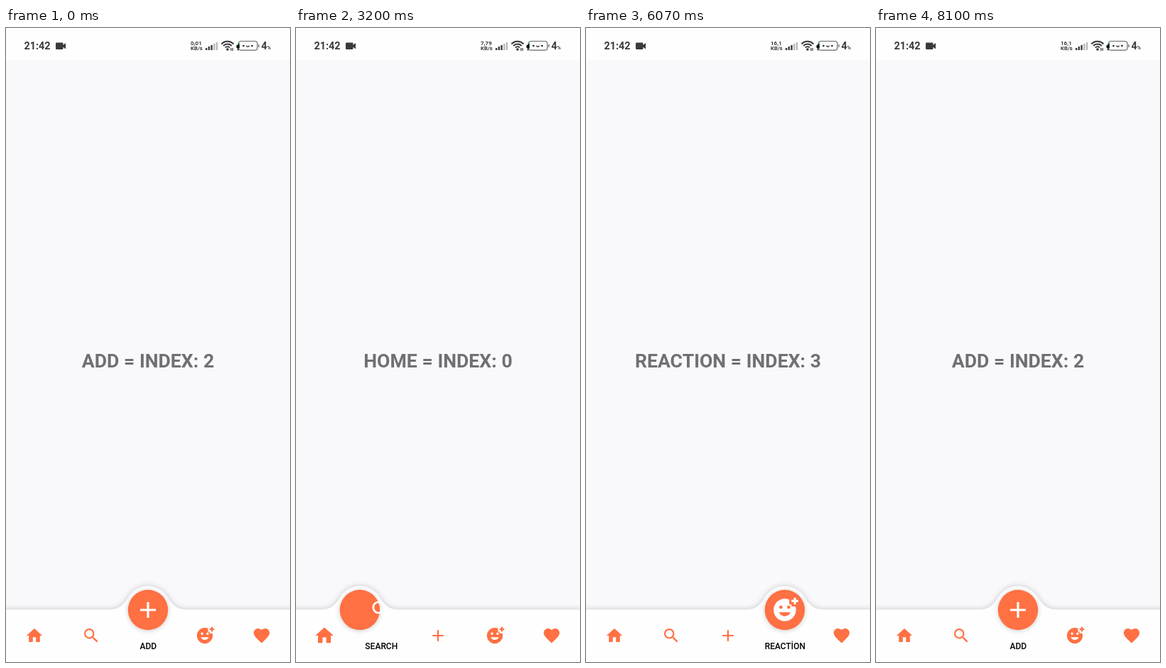
Animation, 400 px wide and 889 px high, one loop 8.9 s. Source, as an HTML page with a canvas:

```html
<!DOCTYPE html>
<html lang="en">
<head>
<meta charset="utf-8">
<title>Curved navigation bar</title>
<style>
  html, body { margin: 0; width: 100%; height: 100%; overflow: hidden; background: #f9f8fb; }
  canvas { display: block; width: 400px; height: 889px; }
</style>
</head>
<body>
<canvas id="stage"></canvas>
<script>
const W = 400, H = 889, LOOP = 8900, DURATION = 220;
const ORANGE = '#ff7043', BAR = '#fefefe', PAGE = '#f9f8fb', INK = '#3a3a3c';
const BAR_Y = 815.5, BUTTON_Y = 816, IDLE_Y = 852;
const SMALL = 26.7, LARGE = 37.8;

const canvas = document.getElementById('stage');
const ctx = canvas.getContext('2d');
const ratio = window.devicePixelRatio || 1;
canvas.width = W * ratio;
canvas.height = H * ratio;

const tabs = [
  { name: 'HOME', icon: 'M10 20v-6h4v6h5v-8h3L12 3 2 12h3v8z' },
  { name: 'SEARCH', icon: 'M15.5 14h-.79l-.28-.27A6.47 6.47 0 0 0 16 9.5 6.5 6.5 0 1 0 9.5 16c1.61 0 3.09-.59 4.23-1.57l.27.28v.79l5 4.99L20.49 19l-4.99-5zm-6 0C7.01 14 5 11.99 5 9.5S7.01 5 9.5 5 14 7.01 14 9.5 11.99 14 9.5 14z' },
  { name: 'ADD', icon: 'M19 13h-6v6h-2v-6H5v-2h6V5h2v6h6v2z' },
  { name: 'REACTION', label: 'REACTİON', icon: 'M18 9V7h-2V2.84C14.77 2.3 13.42 2 11.99 2 6.47 2 2 6.48 2 12s4.47 10 9.99 10C17.52 22 22 17.52 22 12c0-1.05-.17-2.05-.47-3H18zm-2.5-1c.83 0 1.5.67 1.5 1.5s-.67 1.5-1.5 1.5-1.5-.67-1.5-1.5S14.67 8 15.5 8zm-7 0c.83 0 1.5.67 1.5 1.5S9.33 11 8.5 11 7 10.33 7 9.5 7.67 8 8.5 8zM12 17.5c-2.33 0-4.31-1.46-5.11-3.5h10.22c-.8 2.04-2.78 3.5-5.11 3.5zM22 3h2v2h-2v2h-2V5h-2V3h2V1h2v2z' },
  { name: 'FAVORITE', icon: 'M12 21.35l-1.45-1.32C5.4 15.36 2 12.28 2 8.5 2 5.42 4.42 3 7.5 3c1.74 0 3.41.81 4.5 2.09C13.09 3.81 14.76 3 16.5 3 19.58 3 22 5.42 22 8.5c0 3.78-3.4 6.86-8.55 11.54z' }
].map((tab, i) => ({ label: tab.name, ...tab, x: 40 + 80 * i, shape: new Path2D(tab.icon) }));

// "shown" is when the first step of a move reaches the screen.
const moves = [
  { from: 2, to: 0, start: 1785, shown: 1800 },
  { from: 0, to: 1, start: 3075, shown: 3130 },
  { from: 1, to: 2, start: 4118, shown: 4200 },
  { from: 2, to: 3, start: 5208, shown: 5208 },
  { from: 3, to: 4, start: 6455, shown: 6455 },
  { from: 4, to: 2, start: 7870, shown: 7900 }
];
const resting = { from: 2, to: 2, start: -LOOP };

const lerp = (a, b, p) => a + (b - a) * p;

// cubic-bezier(.42, 0, .58, 1)
function easeInOut(x) {
  if (x <= 0) return 0;
  if (x >= 1) return 1;
  let lo = 0, hi = 1, u = 0.5;
  for (let i = 0; i < 20; i++) {
    u = (lo + hi) / 2;
    const bx = 1.26 * u * (1 - u) ** 2 + 1.74 * u * u * (1 - u) + u ** 3;
    if (bx < x) lo = u; else hi = u;
  }
  return u * u * (3 - 2 * u);
}

function text(str, x, y, size, weight, color, align = 'left') {
  ctx.font = `${weight} ${size}px Roboto, sans-serif`;
  ctx.textAlign = align;
  ctx.fillStyle = color;
  ctx.fillText(str, x, y);
}

function dot(x, y, r, color) {
  ctx.fillStyle = color;
  ctx.beginPath();
  ctx.arc(x, y, r, 0, Math.PI * 2);
  ctx.fill();
}

function shadow(color, blur, dy = 0) {
  ctx.shadowColor = color;
  ctx.shadowBlur = blur * ratio;
  ctx.shadowOffsetY = dy * ratio;
}

function drawCamera() {
  ctx.fillStyle = INK;
  ctx.beginPath();
  ctx.roundRect(70, 20.5, 10.5, 9.5, 1.3);
  ctx.moveTo(80, 24.2);
  ctx.lineTo(84, 21);
  ctx.lineTo(84, 29.5);
  ctx.lineTo(80, 26.3);
  ctx.fill();
}

function drawSignal() {
  for (let i = 0; i < 5; i++) {
    const h = 3 + 2 * i;
    ctx.fillStyle = i < 3 ? INK : '#b9b9bc';
    ctx.fillRect(281 + 3.7 * i, 31 - h, 2.4, h);
  }
}

function drawWifi() {
  ctx.strokeStyle = INK;
  ctx.lineWidth = 2;
  for (const r of [4.3, 8, 11.7]) {
    ctx.beginPath();
    ctx.arc(312, 30.5, r, -Math.PI * 0.76, -Math.PI * 0.24);
    ctx.stroke();
  }
  dot(312, 30, 1.8, INK);
  ctx.fillStyle = INK;
  ctx.fillRect(316.3, 28, 1.2, 4);
  ctx.fillRect(318.6, 28, 1.2, 4);
}

function drawBattery() {
  ctx.strokeStyle = '#69696b';
  ctx.lineWidth = 1.2;
  ctx.beginPath();
  ctx.roundRect(327.5, 18.5, 26.5, 12.7, 3.5);
  ctx.stroke();
  ctx.fillStyle = '#69696b';
  ctx.fillRect(355.4, 23, 1.3, 4);
  ctx.fillStyle = '#43c463';
  ctx.fillRect(327.5, 21, 1.6, 8);
  dot(334.5, 25, 1.3, '#222');
  dot(346.5, 25, 1.3, '#222');
  ctx.strokeStyle = '#222';
  ctx.beginPath();
  ctx.arc(340.5, 24.4, 1.9, 0.15, Math.PI - 0.15);
  ctx.stroke();
  ctx.fillStyle = '#111';
  ctx.beginPath();
  ctx.roundRect(324.5, 24, 4.5, 4, 1.2);
  ctx.fill();
  ctx.fillRect(326, 22.5, 3, 1.2);
  ctx.fillRect(326, 27.5, 1.4, 4);
}

function drawStatus(t) {
  ctx.fillStyle = BAR;
  ctx.fillRect(0, 0, W, 44);
  text('21:42', 25.5, 30, 14.4, 700, INK);
  drawCamera();
  const speed = t < 1130 ? '0,01' : t < 5170 ? '7,79' : '16,1';
  text(speed, 260, 23.5, 8, 700, INK);
  text('KB/s', 260, 31, 7.8, 700, INK);
  drawSignal();
  drawWifi();
  drawBattery();
  text('4', 359.5, 30, 14.4, 700, INK);
  text('%', 367.8, 30, 7, 700, INK);
}

function drawBar(x) {
  const r = 33, a = Math.PI / 6;
  const ax = r * Math.cos(a), ay = r * Math.sin(a);
  ctx.save();
  shadow('rgba(0,0,0,0.2)', 9);
  ctx.fillStyle = BAR;
  ctx.beginPath();
  ctx.moveTo(-120, BAR_Y);
  ctx.lineTo(x - 54, BAR_Y);
  ctx.bezierCurveTo(x - 40, BAR_Y, x - ax - 4, BAR_Y - ay + 7, x - ax, BAR_Y - ay);
  ctx.arc(x, BAR_Y, r, Math.PI + a, -a);
  ctx.bezierCurveTo(x + ax + 4, BAR_Y - ay + 7, x + 40, BAR_Y, x + 54, BAR_Y);
  ctx.lineTo(W + 120, BAR_Y);
  ctx.lineTo(W + 120, H + 60);
  ctx.lineTo(-120, H + 60);
  ctx.fill();
  shadow('rgba(0,0,0,0.2)', 7, 1);
  dot(x, BUTTON_Y, 28.2, ORANGE);
  ctx.restore();
}

function drawIcon(tab, y, size, color) {
  const k = size / 24;
  ctx.save();
  ctx.translate(tab.x, y);
  ctx.scale(k, k);
  ctx.translate(-12, -12);
  ctx.fillStyle = color;
  ctx.fill(tab.shape, 'evenodd');
  ctx.restore();
}

function draw(t) {
  const move = moves.filter(m => m.shown <= t).pop() || resting;
  const p = easeInOut((t - move.start) / DURATION);
  const page = t - move.start >= DURATION + 2 ? move.to : move.from;
  const active = tabs[move.to];

  ctx.setTransform(ratio, 0, 0, ratio, 0, 0);
  ctx.fillStyle = PAGE;
  ctx.fillRect(0, 0, W, H);
  drawStatus(t);
  text(`${tabs[page].name} = INDEX: ${page}`, 200, 475.5, 26.67, 700, '#716f74', 'center');

  drawBar(lerp(tabs[move.from].x, active.x, p));
  tabs.forEach((tab, i) => {
    const selected = i === move.to;
    const size = selected && move !== resting ? lerp(SMALL, LARGE, p)
      : selected ? LARGE
      : i === move.from ? lerp(LARGE, SMALL, p) : SMALL;
    drawIcon(tab, selected ? BUTTON_Y : IDLE_Y, size, selected ? '#fff' : ORANGE);
  });
  text(active.label, active.x + 0.3, 870.5, 12, 500, '#000', 'center');
}

const origin = performance.now();
function tick() {
  draw((performance.now() - origin) % LOOP);
  requestAnimationFrame(tick);
}
tick();
</script>
</body>
</html>
```
